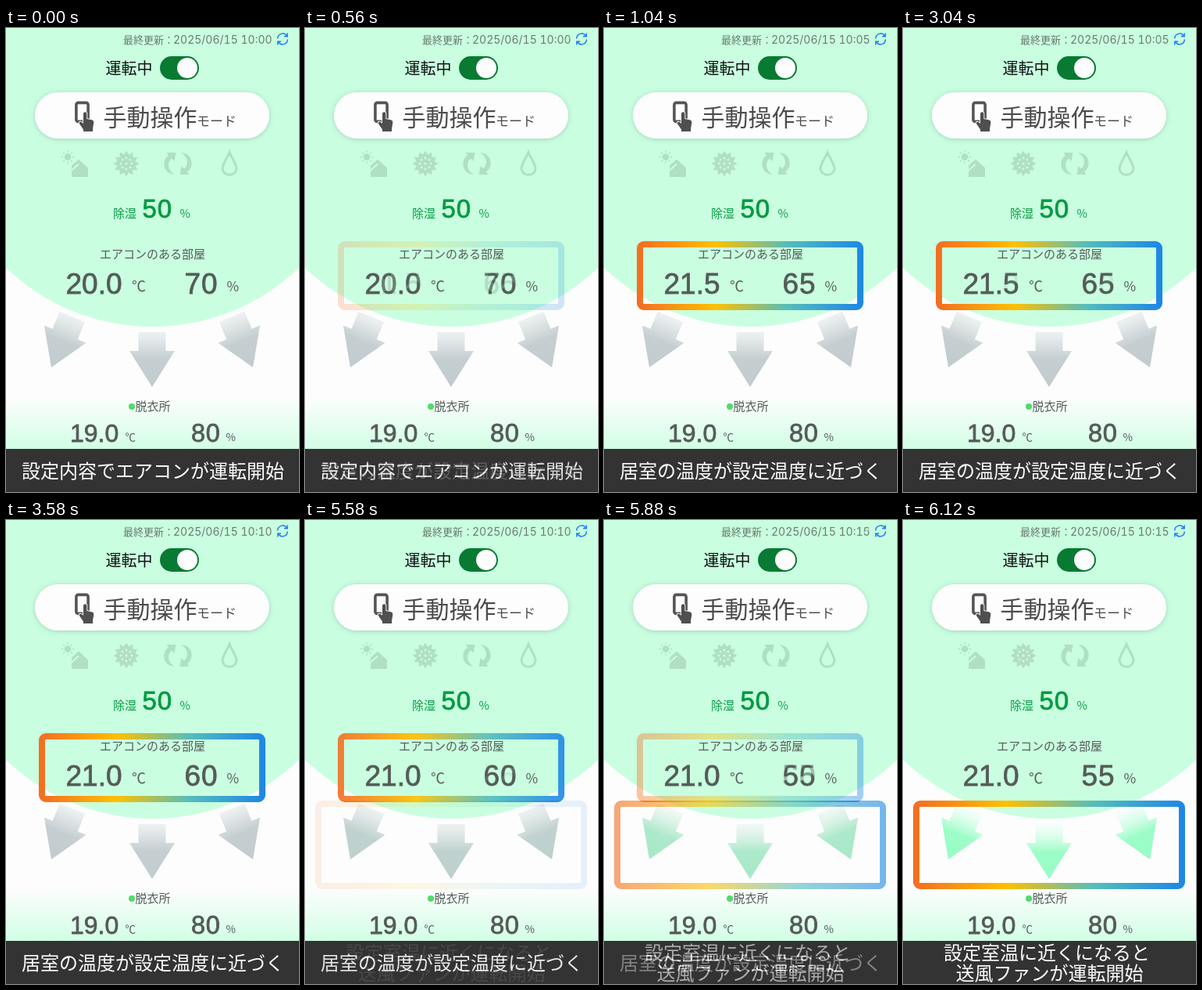
Recreate the animation shown at these times as an HTML page. Size 375 by 592 pixels, loop 8 s.

```html
<!DOCTYPE html>
<html lang="ja">
<head>
<meta charset="utf-8">
<title>運転モード</title>
<style>
html, body { margin: 0; width: 100%; height: 100%; overflow: hidden; background: #fdfdfd; }
svg { display: block; width: 375px; height: 592px; }
text { font-family: "Noto Sans CJK JP", "Noto Sans CJK", sans-serif; font-weight: 350; white-space: pre; }
.thin { font-weight: 300; }
.bold { font-weight: 400; }
.num { font-family: "Liberation Sans", Arial, sans-serif; font-weight: 400; }
.date { font-family: Inter, sans-serif; font-weight: 400; font-variant-numeric: tabular-nums; }
</style>
</head>
<body>
<svg id="stage" viewBox="0 0 375 592"></svg>
<script>
const MINT = '#c9ffe0', ICON = '#b1dfc5', INK = '#555b58', GREEN = '#079a43';
const LOOP = 8000, STEP = 60, STEPS = 10;

const scenes = [
  { at: 0, time: '10:00', temp: '20.0', hum: '70', caption: [[20, 573.5, '設定内容でエアコンが運転開始']] },
  { at: 500, time: '10:05', temp: '21.5', hum: '65', room: true, caption: [[20, 573.5, '居室の温度が設定温度に近づく']] },
  { at: 3040, time: '10:10', temp: '21.0', hum: '60', room: true, caption: [[20, 573.5, '居室の温度が設定温度に近づく']] },
  { at: 5580, time: '10:15', temp: '21.0', hum: '55', flow: true,
    caption: [[52, 561, '設定室温に近くになると'], [67.5, 586.5, '送風ファンが運転開始']] }
];

const label = (x, y, size, fill, str, extra = '') =>
  `<text x="${x}" y="${y}" font-size="${size}" fill="${fill}" ${extra}>${str}</text>`;
const unit = (x, y, size, fill, str) => label(x, y, size, fill, str, 'class="thin"');
const bigNum = (x, y, size, fill, str, gap = 0) =>
  label(x, y, size, fill, str, `class="num" stroke="${fill}" stroke-width=".8" letter-spacing="${gap}"`);

const ramp = (id, dir, stops) => `<linearGradient id="${id}" ${dir}>` +
  stops.map(([o, c, a = 1]) => `<stop offset="${o}" stop-color="${c}" stop-opacity="${a}"/>`).join('') +
  '</linearGradient>';
const down = 'x1="0" y1="0" x2="0" y2="1"';

const defs = '<defs>' +
  ramp('heat', '', [[0, '#f36f21'], [.34, '#ffc000'], [.67, '#55bdbb'], [1, '#1e88e5']]) +
  ramp('floor', down, [[0, '#fdfdfd'], [1, MINT]]) +
  ramp('calm', down, [[0, '#e9eeee', .8], [.48, '#c5ced1'], [1, '#c2cbce']]) +
  ramp('breeze', down, [[0, '#e2fff0', .3], [.5, '#9dfdc8'], [1, '#97fcc4']]) +
  '<filter id="soft" x="-10%" y="-30%" width="120%" height="160%">' +
  '<feDropShadow dx="0" dy="1" stdDeviation="3" flood-color="#456" flood-opacity=".28"/></filter></defs>';

const polar = (cx, cy, r, a) => `${(cx + r * Math.cos(a)).toFixed(2)},${(cy + r * Math.sin(a)).toFixed(2)}`;
const ring = (n, fn) => Array.from({ length: n }, (_, i) => fn(i * 2 * Math.PI / n, i)).join(' ');
const dot = (a, r, size) => {
  const [x, y] = polar(154, 173, r, a).split(',');
  return `<circle cx="${x}" cy="${y}" r="${size}"/>`;
};

const refresh = `<g fill="none" stroke="#1b7cff" stroke-width="1.5">
  <path d="M347.7 13.5A6.3 6.3 0 0 1 359.5 10.4M360.3 14.5A6.3 6.3 0 0 1 348.5 17.6"/>
  <path d="M360.2 6.6V10.8H356M347.8 21.4V17.2H352"/></g>`;

const touch = `<rect x="89.9" y="95.4" width="15.2" height="24" rx="2.5" fill="none" stroke="#555" stroke-width="3.6"/>
  <path d="M99 109.5a2.2 2.2 0 0 1 4.4 0V116l6.4 1.3q2.7.7 2.5 3.6l-1.2 7.2V132H99v-2.6l-5.3-7.6q-.3-2.6 2.4-2l2.9 1.9Z"
  fill="#4f4f4f" stroke="#fdfdfd" stroke-width="1.8" paint-order="stroke"/>`;

const sunHouse = `<circle cx="79" cy="164.5" r="4.3" fill="${ICON}"/>
  <path d="${ring(8, a => `M${polar(79, 164.5, 5.8, a)}L${polar(79, 164.5, 8.3, a)}`)}" stroke="${ICON}" stroke-width="1.4"/>
  <path d="M84 175.5L93 167.5L105 178.5V190H84Z" fill="${ICON}"/>
  <path d="M83 182.5L93 173.5" stroke="${MINT}" stroke-width="2"/>`;

const gear = `<polygon fill="${ICON}" points="${ring(24, (a, i) => polar(154, 173, i % 2 ? 11.8 : 16.6, a))}"/>
  <g fill="${MINT}">${ring(8, a => dot(a, 7, 1.4))}${dot(0, 0, 1.6)}</g>`;

// One curved arrow, turned half round for its partner.
const swirl = 'M216 187C200 186 199 168 208 162.5L205.5 159H217.5L215.5 170L212 166.5C206 171 206.5 182 216 187Z';
const cycle = `<g fill="${ICON}"><path d="${swirl}"/><path d="${swirl}" transform="rotate(180 220 173)"/></g>`;

const drop = `<path d="M286 158.5C283 166.5 277 173 277 180a9.2 9.2 0 0 0 18 0C295 173 289 166.5 286 158.5Z"
  fill="none" stroke="${ICON}" stroke-width="3"/>`;

const arrow = (x, y, turn, fill) =>
  `<path d="M-17.5-70H17.5V-46H29L0 0L-29-46H-17.5Z" transform="translate(${x} ${y}) rotate(${turn})" fill="url(#${fill})"/>`;
const arrows = fill => arrow(58, 433, 22.6, fill) + arrow(187, 458, 0, fill) + arrow(316, 433, -22.6, fill);

const frame = (x, y, w, h) =>
  `<rect x="${x + 4}" y="${y + 4}" width="${w - 8}" height="${h - 8}" rx="5" fill="none" stroke="url(#heat)" stroke-width="8"/>`;

const backdrop = `<rect width="375" height="592" fill="#fdfdfd"/>
  <rect y="470" width="375" height="80" fill="url(#floor)"/>
  <circle cx="187.5" cy="109" r="272" fill="${MINT}"/>`;

const header = label(150, 19.5, 13, '#6a7a71', '最終更新：') + refresh +
  label(127.5, 58.5, 20, '#111', '運転中') +
  `<rect x="197" y="36" width="50" height="30" rx="15" fill="#087a32"/><circle cx="232" cy="51" r="13" fill="#fdfdfd"/>
  <rect x="37" y="82" width="300" height="59" rx="29.5" fill="#fdfdfd" filter="url(#soft)"/>` + touch +
  unit(124.5, 125, 30, '#4c4c4c', '手動操作') + unit(244, 125, 17, '#4c4c4c', 'モード') +
  sunHouse + gear + cycle + drop +
  label(137, 242, 15, GREEN, '除湿') + bigNum(174.5, 242, 33, GREEN, '50', .8) + unit(222.5, 242, 14.5, GREEN, '%');

const rooms = label(120, 293.5, 15, INK, 'エアコンのある部屋') +
  unit(161, 336, 18, INK, '℃') + unit(282.5, 336, 17, INK, '%') +
  '<circle cx="161" cy="483" r="4" fill="#4fdc6c"/>' + label(165.5, 487.5, 15, INK, '脱衣所') +
  bigNum(82, 528, 32, INK, '19.0') + unit(152.5, 527, 13.5, INK, '℃') +
  bigNum(237, 528, 32.5, INK, '80', .8) + unit(281.5, 527, 13.5, INK, '%');

const draw = s => '<g>' + backdrop + header +
  label(214, 19.5, 14, '#6a7a71', '2025/06/15 ' + s.time, 'class="date"') +
  arrows(s.flow ? 'breeze' : 'calm') +
  (s.room ? frame(42, 272, 290, 88) : '') + (s.flow ? frame(13, 358, 348, 113) : '') +
  rooms + bigNum(76.5, 339, 37, INK, s.temp) + bigNum(228.5, 339, 37, INK, s.hum, 1) +
  '<rect y="537" width="375" height="55" fill="#333"/>' +
  s.caption.map(([x, y, str]) => label(x, y, 24, '#fdfdfd', str, 'class="bold"')).join('') + '</g>';

const stage = document.getElementById('stage');
stage.innerHTML = defs + scenes.map(draw).join('');
const layers = stage.querySelectorAll(':scope > g');

const start = performance.now();
function render(now) {
  const t = Math.max(0, now - start) % LOOP;
  // Each opaque scene fades in over the one before it, in ten even steps.
  scenes.forEach((s, i) => {
    const step = Math.floor((t - s.at) / STEP) + 1;
    const p = i ? Math.min(STEPS, Math.max(0, step)) / STEPS : 1;
    layers[i].setAttribute('opacity', p);
  });
  requestAnimationFrame(render);
}
render(start);
</script>
</body>
</html>
```
